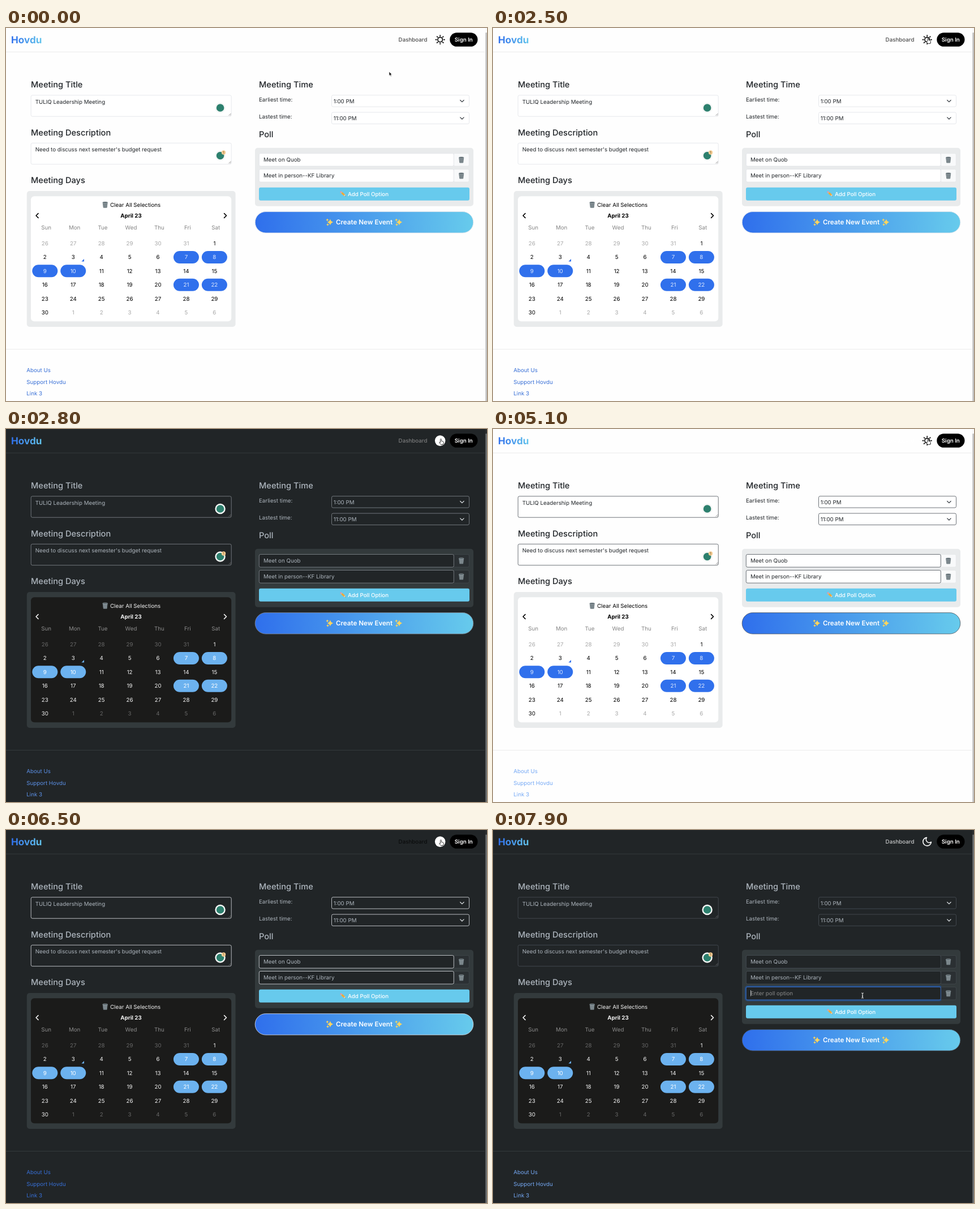
These frames come from a looping animation (850x659 px, 8 s). An HTML page:

```html
<!DOCTYPE html>
<html lang="en">
<head>
<meta charset="utf-8">
<title>Meeting planner</title>
<style>
html, body { margin: 0; width: 100%; height: 100%; overflow: hidden; }
svg {
  display: block; width: 850px; height: 659px;
  font: 9.76px Inter, sans-serif; text-rendering: geometricPrecision;
  --bg: #fefefe; --text: #212529; --strong: #000; --panel: #e9ebec; --card: #fff;
  --field: #fff; --addon: #f8f9fa; --addonLine: #e3e5e8; --line: #ebecec;
  --muted: #a9a9a9; --week: #858585; --pill: #3070ec; --pillText: #dce8ff;
  --track: #fafafa; --thumb: #c1c1c1; --chev: #343a40;
  --border: color-mix(in srgb, #e0e3e7, #495057 var(--u));
  --nav: color-mix(in srgb, rgba(0,0,0,.7), rgba(255,255,255,.75) var(--u));
  --link: color-mix(in srgb, #376fd6, #75a9f5 var(--u));
}
svg.dark {
  --bg: #212527; --text: #adb5bd; --strong: #f2f2f2; --panel: #333a3c; --card: #1b1b1a;
  --field: #212527; --addon: #2b3033; --addonLine: #43494d; --line: #34393b;
  --muted: #666; --week: #8b8b8b; --pill: #6cb2ef; --pillText: #fff;
  --track: #2b2d2e; --thumb: #6a6d6e; --chev: #dee2e6;
}
text { fill: var(--text); }
.mid { text-anchor: middle; }
.head { font-size: 14.64px; font-weight: 500; }
.strong { fill: var(--strong); }
.muted { fill: var(--muted); }
.week { fill: var(--week); }
.link { fill: var(--link); }
.white { fill: #fff; }
.panel { fill: var(--panel); }
.field { fill: var(--field); stroke: var(--border); stroke-width: .8; }
.addon { fill: var(--addon); stroke: var(--addonLine); stroke-width: .8; }
.chev { fill: none; stroke: var(--chev); stroke-width: 1.2; stroke-linecap: round; stroke-linejoin: round; }
.icon { fill: none; stroke-width: 1.6; stroke-linecap: round; stroke-linejoin: round; }
</style>
</head>
<body>
<svg id="stage" viewBox="0 0 850 659"></svg>
<script>
const stage = document.getElementById('stage');
const text = (x, y, s, cls = '', extra = '') => `<text x="${x}" y="${y}" class="${cls}" ${extra}>${s}</text>`;
const rect = (x, y, w, h, r, attrs) => `<rect x="${x}" y="${y}" width="${w}" height="${h}" rx="${r}" ${attrs}/>`;
const path = (d, attrs) => `<path d="${d}" ${attrs}/>`;
const at = (x, y, body) => `<g transform="translate(${x} ${y})">${body}</g>`;

const trash = (x, y) => at(x, y,
  path('M-4 -3.6 L-3 5 H3 L4 -3.6Z', 'fill="#929da2" stroke="#69767c" stroke-width=".8"') +
  path('M-2 -3 L-1.4 5 M0 -3 V5 M2 -3 L1.4 5 M-3.6 -.8 H3.6 M-3.3 2 H3.3', 'stroke="#5d696f" stroke-width=".5"') +
  '<ellipse cy="-4" rx="4.5" ry="1.3" fill="#56636a" stroke="#a5afb3" stroke-width=".6"/>');

const star = (x, y, r) => {
  const q = r * .2;
  return path(`M${x} ${y - r} Q${x + q} ${y - q} ${x + r} ${y} Q${x + q} ${y + q} ${x} ${y + r}` +
    ` Q${x - q} ${y + q} ${x - r} ${y} Q${x - q} ${y - q} ${x} ${y - r}Z`, 'fill="#ffd55c"');
};
const sparkles = x => star(x + 1.4, 343, 5.6) + star(x - 3.6, 339, 2.6) + star(x - 3, 347.4, 2.4);

const pencil = at(595.5, 293, `<g transform="rotate(42)">` +
  rect(-6, -1.6, 2, 3.2, .8, 'fill="#ee8fa0"') + rect(-4.2, -1.6, 1.2, 3.2, 0, 'fill="#b9c0c4"') +
  rect(-3, -1.6, 6.4, 3.2, 0, 'fill="#f2a93b"') + path('M3.4 -1.6 L6.6 0 L3.4 1.6Z', 'fill="#f3d6ac"') +
  path('M5.4 -.6 L6.6 0 L5.4 .6Z', 'fill="#333"') + '</g>');

const textarea = (y, s) => rect(44.2, y, 354, 37.4, 2.5, 'class="field"') + text(51.7, y + 15, s) +
  path(`M393.5 ${y + 36} l4 -4 M395.7 ${y + 36} l1.8 -1.8`, 'stroke="#777" stroke-width=".7"') +
  `<circle cx="378.6" cy="${y + 22.2}" r="8" fill="#2d806e" stroke="#f4f6f5" stroke-width="2.4"/>`;

const select = (y, s) => rect(575.5, y, 243, 20.4, 2.5, 'class="field"') + text(578.7, y + 13.9, s) +
  path(`M802.7 ${y + 8.8} l3.2 3.2 l3.2 -3.2`, 'class="chev"');

const pollRow = (y, s, cls = '', id = '') => rect(791, y, 27.4, 22.6, 2.5, 'class="addon"') +
  rect(447.3, y, 344, 22.6, 2.5, `class="field" ${id}`) + text(455, y + 14.6, s, cls) + trash(804.7, y + 11.5);

function calendar() {
  const picked = [7, 8, 9, 10, 21, 22];
  let out = rect(36.8, 288, 368.8, 240, 5, 'class="panel"') + rect(44, 297.3, 354.2, 221, 6, 'fill="var(--card)"') +
    trash(175.2, 312.3) + text(184, 315.8, 'Clear All Selections', 'strong') +
    text(221, 335, 'April 23', 'strong mid', 'font-weight="700"') +
    path('M57 327.6 l-3.9 3.9 l3.9 3.9 M385.6 327.6 l3.9 3.9 l-3.9 3.9', 'class="icon" stroke="var(--strong)"');
  ['Sun', 'Mon', 'Tue', 'Wed', 'Thu', 'Fri', 'Sat'].forEach((d, i) => {
    out += text(71.2 + i * 49.93, 355.8, d, 'week mid');
  });
  for (let i = 0; i < 42; i++) {
    const day = i - 5, x = 68.8 + i % 7 * 49.93, y = 380.5 + Math.floor(i / 7) * 24.42;
    const on = picked.includes(day), out30 = day < 1 || day > 30;
    if (on) out += rect(x - 22.5, y - 11, 45, 22, 11, 'fill="var(--pill)"');
    out += text(x, y + 3.5, day < 1 ? day + 31 : day > 30 ? day - 30 : day, 'mid ' + (out30 ? 'muted' : 'strong'),
      on ? 'style="fill:var(--pillText)"' : '');
  }
  return out + path('M138 408 V412.6 H133.4Z', 'fill="var(--pill)"');
}

const gradient = (id, x1, x2) => `<linearGradient id="${id}" gradientUnits="userSpaceOnUse" x1="${x1}" x2="${x2}" y1="0" y2="0">
  <stop stop-color="#2f6fec"/><stop offset="1" stop-color="#67cbec"/></linearGradient>`;

const rays = [...Array(8)].map((_, i) => {
  const c = Math.cos(i * Math.PI / 4), s = Math.sin(i * Math.PI / 4);
  return `M${c * 6.4} ${s * 6.4} L${c * 7.9} ${s * 7.9}`;
}).join('');

stage.innerHTML = `<defs>${gradient('logo', 9, 67)}${gradient('wide', 440, 826)}</defs>` +
  rect(0, 0, 850, 659, 0, 'fill="var(--bg)"') +
  path('M0 42.3 H846 M0 567.5 H846', 'stroke="var(--line)"') +
  rect(846.5, 0, 3.5, 659, 0, 'fill="var(--track)"') + rect(847.3, 8, 2.7, 660, 1.3, 'fill="var(--thumb)"') +
  text(9, 26.8, 'Hovdu', '', 'style="fill:url(#logo);font-size:17.1px;font-weight:700"') +
  text(693.6, 24, 'Dashboard', '', 'id="dash" font-weight="500"') +
  at(767.2, 20.6, `<circle id="halo" r="9.3" fill="#fff"/>
    <g id="sun" class="icon" stroke="#000"><circle r="4.2"/><path d="${rays}"/></g>
    <path id="moon" class="icon" stroke="#fff" style="stroke-width:2" transform="translate(-9.8 -9.7) scale(.81)"
      d="M21 12.8 A9 9 0 1 1 11.2 3 A7 7 0 0 0 21 12.8Z"/>`) +
  rect(784.3, 8.2, 49.2, 24.6, 12.3, 'id="sign"') + text(808.8, 24, 'Sign In', 'white mid', 'font-weight="600"') +
  text(44, 105, 'Meeting Title', 'head') + textarea(118.8, 'TULIQ Leadership Meeting') +
  text(44, 189.6, 'Meeting Description', 'head') + textarea(203.3, "Need to discuss next semester's budget request") +
  '<circle cx="384.5" cy="220" r="3.7" fill="#f5cd94"/>' + text(384.5, 222.2, '1', 'mid', 'style="fill:#6b4a1c;font-size:6px"') +
  text(44, 274.2, 'Meeting Days', 'head') + calendar() +
  text(447, 105, 'Meeting Time', 'head') +
  text(447, 129.6, 'Earliest time:') + select(118.7, '1:00 PM') +
  text(447, 160, 'Lastest time:') + select(149, '11:00 PM') +
  text(447, 193, 'Poll', 'head') +
  rect(440, 211.8, 386, 103, 5, 'id="pollPanel" class="panel"') +
  pollRow(221.5, 'Meet on Quob') + pollRow(249.5, 'Meet in person--KF Library') +
  `<g id="newRow">${rect(446.1, 276.3, 346.4, 25, 3.5, 'id="glow" fill="none" stroke="#0d6efd" stroke-opacity=".35" stroke-width="2.4"')}
    ${pollRow(277.4, 'Enter poll option', 'week', 'id="newField"')}
    ${rect(455, 283, .8, 10.6, 0, 'id="caret" fill="#d5d9dc"')}</g>` +
  `<g id="buttons">${rect(445.8, 280.6, 374.4, 25.4, 4.5, 'id="ring" fill="none" stroke="#3184fd" stroke-opacity=".5" stroke-width="2.4"')}
    ${rect(447, 281.8, 372, 23, 3, 'id="add" fill="#67caed"')}${pencil}
    ${text(604, 296.8, 'Add Poll Option', 'white', 'font-weight="500"')}
    ${rect(440.2, 324.6, 385.6, 37.4, 18.7, 'fill="url(#wide)" stroke="var(--border)" stroke-width=".8"')}
    ${sparkles(571.5)}${text(633, 347.2, 'Create New Event', 'white mid', 'style="font-size:11.6px;font-weight:600"')}${sparkles(693.5)}</g>` +
  text(36.3, 607.8, 'About Us', 'link') + text(36.3, 628.7, 'Support Hovdu', 'link') + text(36.3, 649.4, 'Link 3', 'link') +
  `<g id="cursor">
    <path id="arrow" d="M0 0 V7.4 L1.7 5.9 L2.9 8.6 L4.2 8 L3 5.4 H5.2Z" fill="#111" stroke="#fff" stroke-width=".7"/>
    <path id="hand" d="M-1 1 Q-1 0 0 0 T1 1 V3.8 L4 4.5 Q5 4.8 4.8 6.4 L4 10 H0 L-2.8 6.6 Q-2.8 5.2 -1 6.2Z" fill="#fff" stroke="#111" stroke-width=".8"/>
    <g id="beam" fill="none"><path d="M-1.8 -4.5 Q0 -4.5 0 -3.4 Q0 -4.5 1.8 -4.5 M0 -3.4 V3.4 M-1.8 4.5 Q0 4.5 0 3.4 Q0 4.5 1.8 4.5 M-1 1.2 H1" stroke="#fff" stroke-width="1"/></g>
  </g>`;

const el = {};
stage.querySelectorAll('[id]').forEach(n => el[n.id] = n);
const show = (name, on) => el[name].style.display = on ? '' : 'none';

// Pointer stops: time, x, y
const stops = [[0, 677, 77], [420, 677, 77], [1330, 745, 17], [1830, 806, 20], [2020, 806, 20], [2520, 768.5, 17.5],
  [6620, 768.5, 17.5], [7300, 652, 299], [7520, 652, 299], [7880, 653, 292.5], [8000, 653, 292.5]];
const clamp = v => Math.max(0, Math.min(1, v));
const smooth = v => v * v * (3 - 2 * v);
const fade = (t, start) => smooth(clamp((t - start) / 180));

function pointer(t) {
  const i = stops.findIndex(s => s[0] > t), [a, ax, ay] = stops[i - 1], [b, bx, by] = stops[i];
  const k = smooth((t - a) / (b - a));
  return [ax + (bx - ax) * k, ay + (by - ay) * k];
}

function draw(t) {
  const dark = t >= 2700 && t < 5100 || t >= 6500, added = t >= 7400;
  const [x, y] = pointer(t);
  const over = (x1, y1, x2, y2) => x > x1 && x < x2 && y > y1 && y < y2;
  const overDash = over(694, 12, 746, 29), overSun = over(757, 10, 777, 31), overSign = over(784, 8, 834, 33);
  const overAdd = !added && over(447, 282, 819, 305);
  const overField = over(447, 221, 791, 244) || over(447, 249, 791, 272) || added && over(447, 277, 791, 300);
  const hand = overDash || overSun || overSign || overAdd;

  stage.classList.toggle('dark', dark);
  stage.style.setProperty('--u', 100 * (fade(t, 2700) - fade(t, 5100) + fade(t, 6500)) + '%');
  el.dash.style.fill = overDash ? (dark ? '#fff' : '#000') : 'var(--nav)';
  el.sign.style.fill = overSign ? '#333' : '#000';
  show('sun', !dark);
  show('moon', dark);
  show('halo', dark && overSun);

  const shift = added ? 28 : 0, focus = fade(t, 7690);
  show('newRow', added);
  el.pollPanel.setAttribute('height', 103 + shift);
  el.buttons.setAttribute('transform', `translate(0 ${shift})`);
  el.add.style.fill = overAdd ? '#5dbfe4' : '#67caed';
  el.ring.style.opacity = fade(t, 7300) * (1 - fade(t, 7600));
  el.glow.style.opacity = focus;
  el.newField.style.stroke = `color-mix(in srgb, #495057, #3f78d8 ${focus * 100}%)`;
  show('caret', focus > 0);

  el.cursor.setAttribute('transform', `translate(${x} ${y})`);
  show('hand', hand);
  show('beam', !hand && overField);
  show('arrow', !hand && !overField);
}

function frame() {
  draw(performance.now() % 8000);
  requestAnimationFrame(frame);
}
frame();
</script>
</body>
</html>
```
